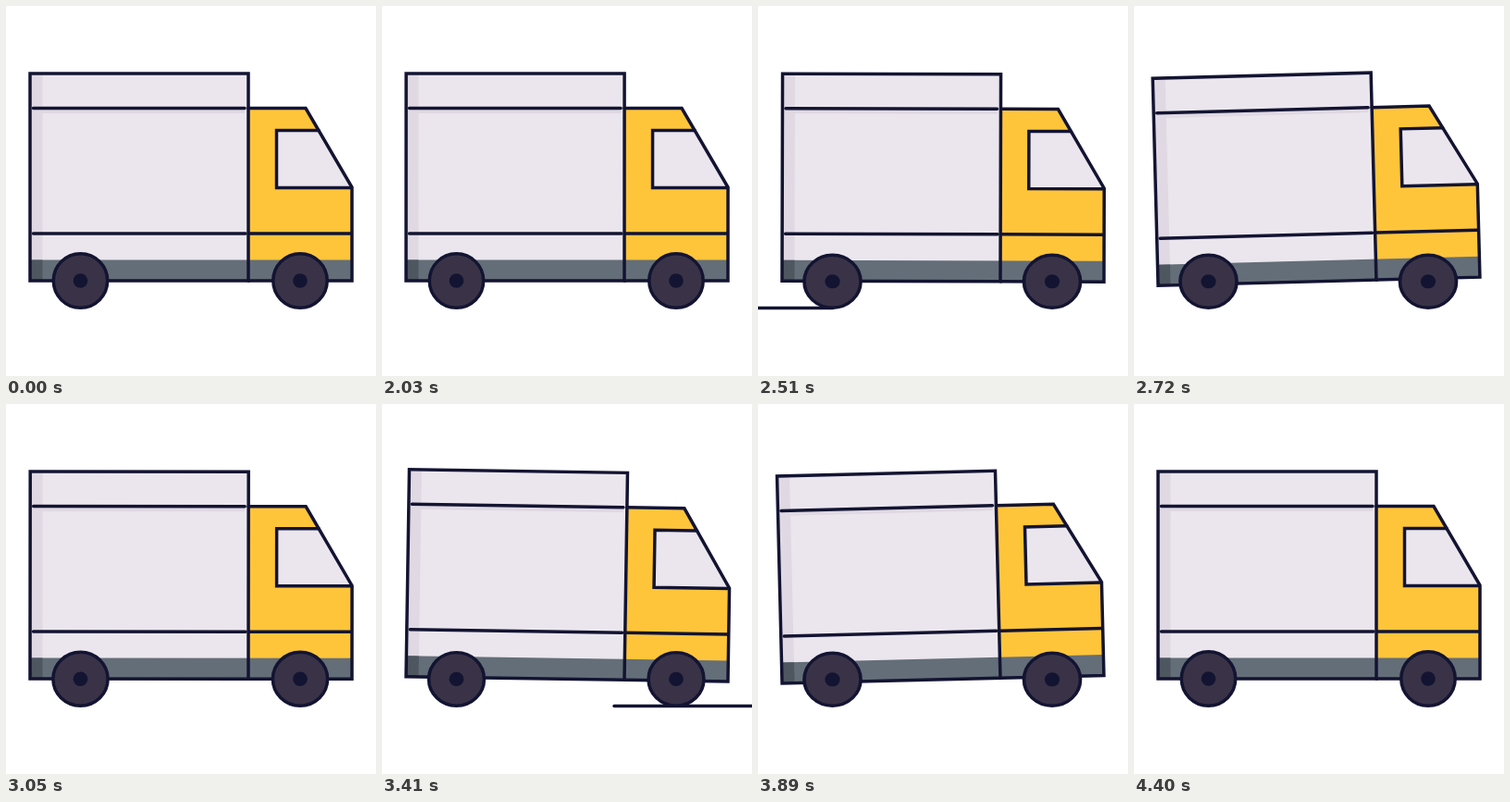
Animation, 400 px wide and 400 px high, one loop 4430 ms. Source, as an HTML page:

```html
<!DOCTYPE html>
<html lang="en">
<head>
<meta charset="utf-8">
<title>Delivery truck</title>
<style>
  html, body { margin: 0; height: 100%; overflow: hidden; background: #fff; }
  svg { display: block; width: 100vw; height: 100vh; }
  .ink { fill: none; stroke: #131432; stroke-width: 3.5; stroke-linecap: round; stroke-linejoin: miter; }
</style>
</head>
<body>
<svg viewBox="0 0 400 400">
  <path id="road" class="ink" d="M0 326.5H272.5"/>
  <g id="body">
    <path fill="#ebe6ed" d="M26 73H262V297H26Z"/>
    <path fill="#e0d9e3" d="M26 73H39.5V297H26ZM39.5 110H258V116H39.5Z"/>
    <path fill="#ffc53a" d="M262 110.5H324L374 196V297H262Z"/>
    <path fill="#646e78" d="M26 274.5H374V297H26Z"/>
    <path fill="#4e5660" d="M26 274.5H39.5V297H26Z"/>
    <path fill="#ebe6ed" d="M292.5 134.5H338L374 196.5H292.5Z"/>
    <path class="ink" d="M26 73H262V297H26Z"/>
    <path class="ink" d="M262 110.5H324L374 196V297H262"/>
    <path class="ink" d="M338 134.5H292.5V196.5H373"/>
    <path class="ink" d="M29.5 110.5H258M29.5 246H259M263 246H373"/>
  </g>
  <g class="wheel">
    <circle cx="80.5" cy="297" r="29.2" fill="#3a3347" stroke="#131432" stroke-width="3.5"/>
    <circle cx="80.5" cy="297" r="7.8" fill="#131432"/>
  </g>
  <g class="wheel">
    <circle cx="318" cy="297" r="29.2" fill="#3a3347" stroke="#131432" stroke-width="3.5"/>
    <circle cx="318" cy="297" r="7.8" fill="#131432"/>
  </g>
</svg>
<script>
  const LOOP = 4430, START = 2000, RIDE = 1200;
  const tilt = [[0, 0], [330, 1.25], [745, -1.52], [950, 0.08], [1200, 0]];
  const squash = [[0, 0], [400, 1], [800, 1], [1200, 0]];
  const axles = [80.5, 318];

  const road = document.getElementById('road');
  const body = document.getElementById('body');
  const wheels = document.querySelectorAll('.wheel');

  // Sine-eased value of a [time, value] table
  function sample(keys, t) {
    const i = Math.max(1, keys.findIndex(k => k[0] >= t));
    const [t0, a] = keys[i - 1], [t1, b] = keys[i];
    return a + (b - a) * (1 - Math.cos(Math.PI * (t - t0) / (t1 - t0))) / 2;
  }

  function draw(time) {
    const t = time % LOOP - START;
    const p = t > 0 && t < 2 * RIDE ? t % RIDE : 0;
    const s = sample(squash, p);

    body.setAttribute('transform', `translate(0 ${0.7 * s}) rotate(${sample(tilt, p)} 200 297)`);
    wheels.forEach((w, i) => w.setAttribute('transform',
      `translate(${axles[i]} 327.5) scale(${1 + 0.045 * s} ${1 - 0.025 * s}) translate(${-axles[i]} -327.5)`));

    // The road streak crosses from right to left once per ride
    road.setAttribute('transform', `translate(${75.5 - 1.475 * (p - 330)} 0)`);
    road.style.visibility = p > 90 && p < 600 ? 'visible' : 'hidden';
  }

  const origin = performance.now();
  function tick() {
    draw(performance.now() - origin);
    requestAnimationFrame(tick);
  }
  draw(0);
  requestAnimationFrame(tick);
</script>
</body>
</html>
```
